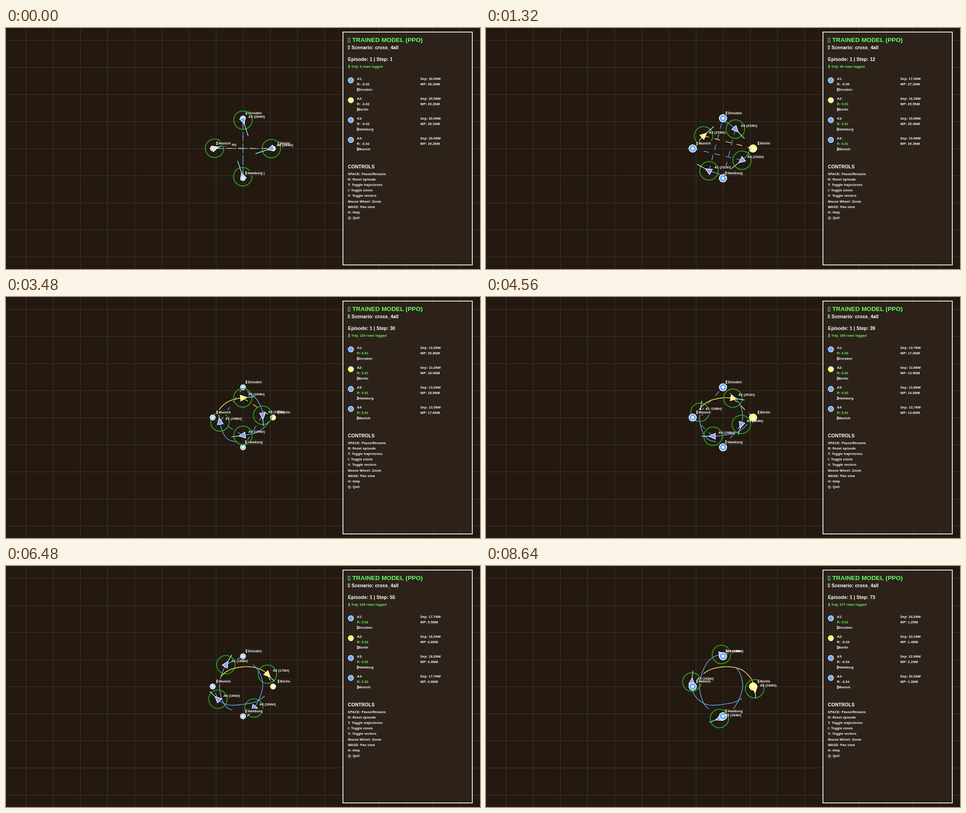
These frames come from a looping animation (1048x534 px, 8760 ms). An HTML page with a canvas:

```html
<!DOCTYPE html>
<html lang="en">
<head>
<meta charset="utf-8">
<title>Trained model, cross_4all</title>
<style>
  html, body { margin: 0; width: 100%; height: 100%; overflow: hidden; background: #231910; }
  canvas { display: block; width: 1048px; height: 534px; }
</style>
</head>
<body>
<canvas id="stage" width="1048" height="534"></canvas>
<script>
const ctx = document.getElementById('stage').getContext('2d');
const STEP_MS = 120, STEPS = 73, ARRIVAL = 68;
const NM_PER_PX = 0.2257, VECTOR_PER_KT = 0.13, START_KT = 284;
const CENTER = [523.8, 266.8];
const WHITE = '#fff', GREEN = '#64ff64', BLUE = '#6eaaff', YELLOW = '#ffff64';

// Every plane enters with the same turn, rotated by quarters; then it passes its own points.
const KEY_STEPS = [1, 5, 12, 30, 47, 64, 73];
const ENTRY = [[-0.3, 62.7], [-12.5, 55.6]], ENTRY_VELOCITY = [-1.1, -3.4];

const planes = [
  { id: 'A1', goal: 'Dresden', wx: 524, wy: 200, quarter: 0, cruise: 198, slowdown: 0,
    via: [[493, 316.5], [473, 277], [478, 236.5], [500.5, 203], [520.5, 196]] },
  { id: 'A2', goal: 'Berlin', wx: 590.5, wy: 267, quarter: 1, cruise: 204, slowdown: 42,
    via: [[481, 239], [523.5, 223.5], [564, 229.5], [589, 255], [594, 272]] },
  { id: 'A3', goal: 'Hamburg', wx: 524, wy: 333, quarter: 2, cruise: 184, slowdown: 0,
    via: [[551.5, 224], [567.5, 262], [557.5, 299.5], [534, 328.5], [516, 338]] },
  { id: 'A4', goal: 'Munich', wx: 457, wy: 267, quarter: 3, cruise: 199, slowdown: 7,
    via: [[566, 293], [524, 306.5], [484, 305.5], [457, 278], [455, 257]] }
];

const CONTROLS = ['SPACE: Pause/Resume', 'R: Reset episode', 'T: Toggle trajectories', 'I: Toggle zones',
  'V: Toggle vectors', 'Mouse Wheel: Zoom', 'WASD: Pan view', 'H: Help', 'Q: Quit'];

const clamp01 = v => Math.max(0, Math.min(1, v));

function rotate([x, y], angle) {
  const c = Math.cos(angle), s = Math.sin(angle);
  return [x * c - y * s, x * s + y * c];
}

// Tangents of a smooth curve through unevenly timed values.
function tangents(values, first) {
  const gap = i => KEY_STEPS[i + 1] - KEY_STEPS[i];
  const slope = i => (values[i + 1] - values[i]) / gap(i);
  const last = values.length - 1;
  const m = [first];
  for (let i = 1; i < last; i++) {
    m.push((slope(i - 1) * gap(i) + slope(i) * gap(i - 1)) / (gap(i - 1) + gap(i)));
  }
  m.push(2 * slope(last - 1) - m[last - 1]);
  return m;
}

// Value and rate of the Hermite curve at step n.
function curve(values, m, n) {
  let i = 0;
  while (i < values.length - 2 && n >= KEY_STEPS[i + 1]) i++;
  const span = KEY_STEPS[i + 1] - KEY_STEPS[i], u = (n - KEY_STEPS[i]) / span;
  const d = values[i + 1] - values[i], a = m[i] * span, b = m[i + 1] * span;
  const c2 = 3 * d - 2 * a - b, c3 = a + b - 2 * d;
  return [values[i] + u * (a + u * (c2 + u * c3)), (a + u * (2 * c2 + 3 * u * c3)) / span];
}

planes.forEach(p => {
  const turn = p.quarter * Math.PI / 2;
  p.color = p.goal === 'Berlin' ? YELLOW : BLUE;
  p.last = p.goal === 'Dresden' ? STEPS : ARRIVAL;
  const entry = ENTRY.map(e => rotate(e, turn).map((v, axis) => v + CENTER[axis]));
  const v0 = rotate(ENTRY_VELOCITY, turn);
  const axes = [0, 1].map(axis => {
    const values = [...entry, ...p.via].map(k => k[axis]);
    return { values, m: tangents(values, v0[axis]) };
  });
  p.poses = [null];
  for (let n = 1; n <= STEPS; n++) {
    const [[x, vx], [y, vy]] = axes.map(a => curve(a.values, a.m, n));
    p.poses.push({ x, y, vx, vy, angle: Math.atan2(vy, vx) });
  }
});

const nm = (a, x, y) => Math.hypot(a.x - x, a.y - y) * NM_PER_PX;
const goalDistance = (p, n) => nm(p.poses[n], p.wx, p.wy);
const separation = (p, n) => Math.min(...planes.filter(q => q !== p)
  .map(q => nm(p.poses[n], q.poses[n].x, q.poses[n].y)));

function speedAt(p, n) {
  const braking = Math.pow(clamp01(1 - (n - 1) / 20), 1.2);
  return p.cruise + (START_KT - p.cruise) * braking - p.slowdown * clamp01((n - 37) / 24);
}

// Closing in on the goal pays, excess speed costs.
function rewardAt(p, n) {
  const { x, y, vx, vy } = p.poses[n];
  const dx = p.wx - x, dy = p.wy - y;
  const closing = (vx * dx + vy * dy) / Math.hypot(dx, dy);
  const excess = Math.max(0, speedAt(p, n) - 235);
  return Math.min(0.02, 0.0135 * closing - 0.0113) - 0.0008 * excess;
}

function line(points, color, width) {
  ctx.beginPath();
  points.forEach(([x, y]) => ctx.lineTo(x, y));
  ctx.strokeStyle = color;
  ctx.lineWidth = width;
  ctx.stroke();
}

function disc(x, y, r, fill) {
  ctx.beginPath();
  ctx.arc(x, y, r, 0, 7);
  ctx.fillStyle = fill;
  ctx.fill();
}

function setFont(size) {
  ctx.font = `bold ${size}px "Liberation Sans", Arial, sans-serif`;
  ctx.letterSpacing = size < 8 ? '0.22px' : '0px';
}

function text(str, x, mid, size = 7.2, color = WHITE) {
  setFont(size);
  ctx.fillStyle = color;
  ctx.fillText(str, x, mid + size * 0.36);
}

function glyphBox(x, mid, w, h, color = WHITE) {
  ctx.strokeStyle = color;
  ctx.lineWidth = 1;
  ctx.strokeRect(x + 0.5, Math.floor(mid - h / 2) + 0.5, w, h);
}

function grid() {
  ctx.fillStyle = '#231910';
  ctx.fillRect(0, 0, 1048, 534);
  ctx.fillStyle = '#40372e';
  for (let x = 44; x < 1048; x += 60) ctx.fillRect(x, 0, 1, 534);
  for (let y = 27; y < 534; y += 60) ctx.fillRect(0, y, 1048, 1);
}

function dashes(x0, y0, x1, y1, color) {
  const count = Math.floor(Math.hypot(x1 - x0, y1 - y0) / 12);
  const at = i => [x0 + (x1 - x0) * i / count, y0 + (y1 - y0) * i / count];
  for (let i = 0; i < count; i += 2) line([at(i), at(i + 1)], color, 1.4);
}

function waypoint(p, n) {
  const r = 7.5 - 1.5 * Math.cos(2.574 * (n - 1));
  disc(p.wx, p.wy, r, WHITE);
  disc(p.wx, p.wy, r - 1.7, p.color);
  disc(p.wx, p.wy, 3, WHITE);

  setFont(7.2);
  const w = Math.round(ctx.measureText(p.goal).width + 9);
  const left = Math.round(p.wx + 24.5 - w / 2), mid = p.wy - 11.5;
  ctx.fillStyle = '#2a2018';
  ctx.fillRect(left, mid - 5.5, w, 11);
  glyphBox(left + 1, mid, 2, 6);
  text(p.goal, left + 6.3, mid);
}

function plane(p, n) {
  const { x, y, angle } = p.poses[n];
  const speed = speedAt(p, n);
  const local = point => {
    const [dx, dy] = rotate(point, angle);
    return [x + dx, y + dy];
  };

  const first = Math.max(1, Math.floor(n * 0.165));
  line(p.poses.slice(first, Math.min(n, p.last) + 1).map(q => [q.x, q.y]), p.color, 1.4);

  ctx.beginPath();
  ctx.arc(x, y, 20.4, 0, 7);
  ctx.strokeStyle = '#23a023';
  ctx.lineWidth = 2;
  ctx.stroke();

  dashes(x, y, p.wx, p.wy, p.color);
  line([[x, y], local([speed * VECTOR_PER_KT, 0])], '#96ffff', 1.4);

  ctx.beginPath();
  [[9, 0], [-5, -6.5], [-5, 6.5]].forEach(corner => ctx.lineTo(...local(corner)));
  ctx.closePath();
  ctx.fillStyle = p.color;
  ctx.fill();
  ctx.strokeStyle = WHITE;
  ctx.lineWidth = 1.3;
  ctx.stroke();

  waypoint(p, n);
  text(`${p.id} (${Math.round(speed)}kt)`, x + 12, y - 8);
}

function panel(n) {
  ctx.fillStyle = 'rgba(46, 36, 27, 0.88)';
  ctx.fillRect(744, 8, 288, 518);
  ctx.strokeStyle = WHITE;
  ctx.lineWidth = 1.7;
  ctx.strokeRect(745, 9, 286, 516);

  glyphBox(756, 26.5, 4, 9, GREEN);
  text('TRAINED MODEL (PPO)', 765.5, 26.5, 13.7, GREEN);
  glyphBox(756, 43, 3, 7);
  text('Scenario: cross_4all', 764, 43, 10.7);
  text(`Episode: 1 | Step: ${n}`, 756, 69.5, 10.7);
  const rows = n <= ARRIVAL ? 4 * n : 3 * ARRIVAL + n;
  glyphBox(757, 85.5, 2, 6, GREEN);
  text(`Traj: ${rows} rows logged`, 763.5, 85.5, 7.2, GREEN);

  planes.forEach((p, i) => {
    const y = 112 + 44 * i, reward = rewardAt(p, n);
    disc(762.5, y + 4, 6.5, WHITE);
    disc(762.5, y + 4, 5.3, p.color);
    text(`${p.id}:`, 776, y);
    text(`R: ${reward.toFixed(2)}`, 776, y + 12, 7.2, reward > 0 ? GREEN : WHITE);
    glyphBox(776, y + 24, 2, 6);
    text(p.goal, 779.5, y + 24);
    text(`Sep: ${separation(p, n).toFixed(1)}NM`, 916, y);
    text(`WP: ${goalDistance(p, n).toFixed(1)}NM`, 916, y + 12);
  });

  text('CONTROLS', 756, 307, 10.5);
  CONTROLS.forEach((c, i) => text(c, 756, 323 + 12.2 * i));
}

const start = performance.now();
let shown = 0;

function frame() {
  const t = (performance.now() - start) % (STEPS * STEP_MS);
  const n = Math.floor(t / STEP_MS) + 1;
  if (n !== shown) {
    shown = n;
    grid();
    planes.forEach(p => plane(p, n));
    panel(n);
  }
  requestAnimationFrame(frame);
}
frame();
</script>
</body>
</html>
```
